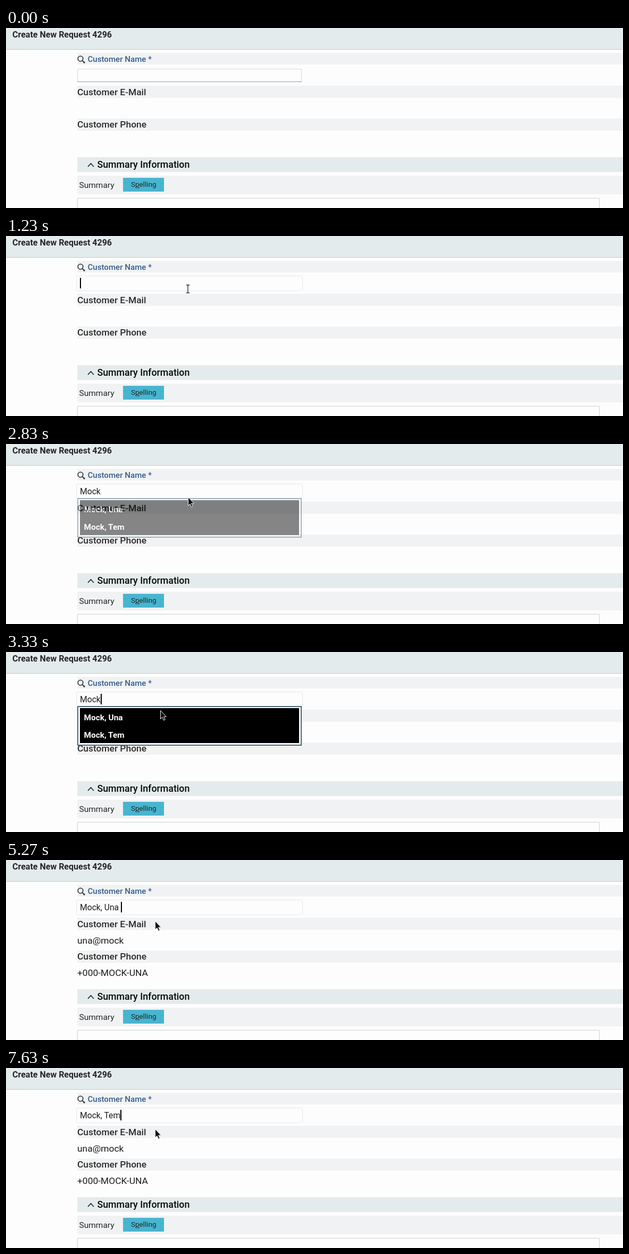
An HTML page that plays this animation: 1160x340 px, repeating every 8 s.

```html
<!DOCTYPE html>
<html lang="en">
<head>
<meta charset="utf-8">
<title>Create New Request</title>
<style>
  html, body { margin: 0; width: 100%; height: 100%; overflow: hidden; background: #fdfdfd; }
  svg { display: block; }
  text { font-family: Roboto, sans-serif; white-space: pre; fill: #262628; }
  .label { font-size: 17.4px; font-weight: 500; fill: #2c2c2e; }
  .value { font-size: 17.4px; fill: #1c1c1e; }
  .field { font-size: 15.7px; fill: #1c1c1e; }
  .option { font-size: 15.4px; font-weight: 700; fill: #fff; }
  .band { fill: #f0f2f3; }
  .strong { fill: #e4ebed; }
</style>
</head>
<body>
<svg width="1160" height="340" viewBox="0 0 1160 340">
  <rect class="strong" width="1160" height="40"/>
  <rect y="40" width="1160" height="1" fill="#c6c7d4"/>
  <text x="12" y="17.5" font-size="16" font-weight="700">Create New Request 4296</text>

  <rect class="band" x="134" y="47" width="1026" height="22"/>
  <g fill="none" stroke="#3c3c3e" stroke-width="1.8">
    <circle cx="140" cy="58" r="4.8"/>
    <path d="M143.5 61.5l3 3"/>
    <circle cx="147" cy="65" r=".8"/>
  </g>
  <text x="153.5" y="64" font-size="15.1" font-weight="500" style="fill:#345e8c">Customer Name *</text>

  <g id="idle" fill="none">
    <path d="M134.5 101V77.5H555.5V101" stroke="#d2d8dc"/>
    <path d="M134 101.5H556" stroke="#78a8cc"/>
  </g>
  <rect id="focused" x="132.5" y="75.5" width="425" height="28" rx="3" fill="#fdfdfd" stroke="#e4e6ee"/>
  <rect id="selection" y="77" height="26" fill="#0078d7"/>
  <text class="field" x="139" y="95"><tspan id="head"></tspan><tspan id="tail" style="fill:#fff"></tspan></text>
  <rect id="caret" y="79" width="2" height="20"/>

  <rect class="band" x="134" y="109" width="1026" height="23"/>
  <text class="label" x="134" y="126.5">Customer E-Mail</text>
  <rect class="band" x="134" y="171" width="1026" height="23"/>
  <text class="label" x="134" y="187.5">Customer Phone</text>
  <g id="details">
    <text class="value" x="134" y="158">una@mock</text>
    <text class="value" x="134" y="219">+000-MOCK-UNA</text>
  </g>

  <rect class="strong" x="134" y="244" width="1026" height="28"/>
  <path d="M154 262l5.5-6 5.5 6" fill="none" stroke="#222224" stroke-width="1.7"/>
  <text x="171.5" y="264" font-size="17.8" font-weight="500" style="fill:#080808">Summary Information</text>

  <rect class="band" x="134" y="279" width="1026" height="35"/>
  <text x="137.5" y="302" font-size="15.5">Summary</text>
  <rect x="220" y="283" width="77" height="26" fill="#48b5d0"/>
  <text x="235" y="300" font-size="13.5">S<tspan text-decoration="underline">p</tspan>elling</text>
  <path d="M134.5 340V321.5H1115.5V340" fill="none" stroke="#ccced0"/>

  <g id="popup">
    <rect x="135" y="103" width="420" height="73" fill="#fdfdfd" stroke="#48687a" stroke-width="2"/>
    <rect x="139" y="106" width="412" height="66"/>
    <rect id="hover" x="139" y="106" width="412" height="33" fill="#222"/>
    <text class="option" x="146.5" y="129">Mock, Una</text>
    <text class="option" x="146.5" y="162">Mock, Tem</text>
  </g>

  <path id="arrow" d="M.5 .5V16.5L4 13.2L6.6 19L9.2 17.8L6.7 12.2H11.5Z" fill="#101010" stroke="#f4f4f4"/>
  <path id="beam" d="M-3-7.5H-1L0-6.5L1-7.5H3M0-6.5V6.5M-3 7.5H-1L0 6.5L1 7.5H3" fill="none" stroke="#262626" stroke-width="1.3"/>
</svg>
<script>
const LOOP = 8000;
const $ = id => document.getElementById(id);
const show = (id, on) => $(id).style.opacity = Number(on);
const ramp = (t, from, to) => Math.min(1, Math.max(0, (t - from) / (to - from)));
const within = (t, from, to) => t >= from && t < to;

// Pointer stops: time, x, y
const path = [[60, 640, -25], [570, 375, 80], [830, 342, 100],
              [3070, 342, 100], [3330, 290, 110], [3470, 280, 115]];
// Field content from a given time on
const entries = [[0, ''], [1430, 'M'], [1630, 'Mo'], [1830, 'Moc'], [2030, 'Mock'],
                 [4030, 'Mock, Una '], [6030, 'Mock, T'], [6230, 'Mock, Te'], [6370, 'Mock, Tem']];
const caretHidden = [[0, 830], [2600, 3170], [4670, 5270], [5630, 6030], [6970, 7570]];

function pointer(t) {
  const next = path.findIndex(p => p[0] > t);
  const i = next < 0 ? path.length - 1 : Math.max(1, next);
  const [a, b] = [path[i - 1], path[i]];
  const k = ramp(t, a[0], b[0]);
  return [a[1] + (b[1] - a[1]) * k, a[2] + (b[2] - a[2]) * k];
}

function draw(t) {
  const [x, y] = pointer(t);
  const beam = y >= 77 && t < 2800;
  for (const id of ['arrow', 'beam']) $(id).setAttribute('transform', `translate(${x} ${y})`);
  show('beam', beam);
  show('arrow', !beam);

  const text = entries.findLast(e => e[0] <= t)[1];
  const selected = within(t, 5630, 6030);
  const head = selected ? 'Mock, ' : text;
  $('head').textContent = head;
  $('tail').textContent = text.slice(head.length);
  const width = id => $(id).textContent ? $(id).getComputedTextLength() : 0;
  const start = 139 + width('head');
  $('selection').setAttribute('x', start);
  $('selection').setAttribute('width', selected ? width('tail') : 0);
  $('caret').setAttribute('x', Math.round(start));

  const focused = t >= 830;
  show('idle', !focused);
  show('focused', focused);
  show('caret', !caretHidden.some(([from, to]) => within(t, from, to)));
  show('popup', t < 4030 ? ramp(t, 2770, 2900) : 0);
  show('hover', t >= 3370);
  show('details', ramp(t, 4370, 4500));
}

(function frame() {
  draw(performance.now() % LOOP);
  requestAnimationFrame(frame);
})();
</script>
</body>
</html>
```
